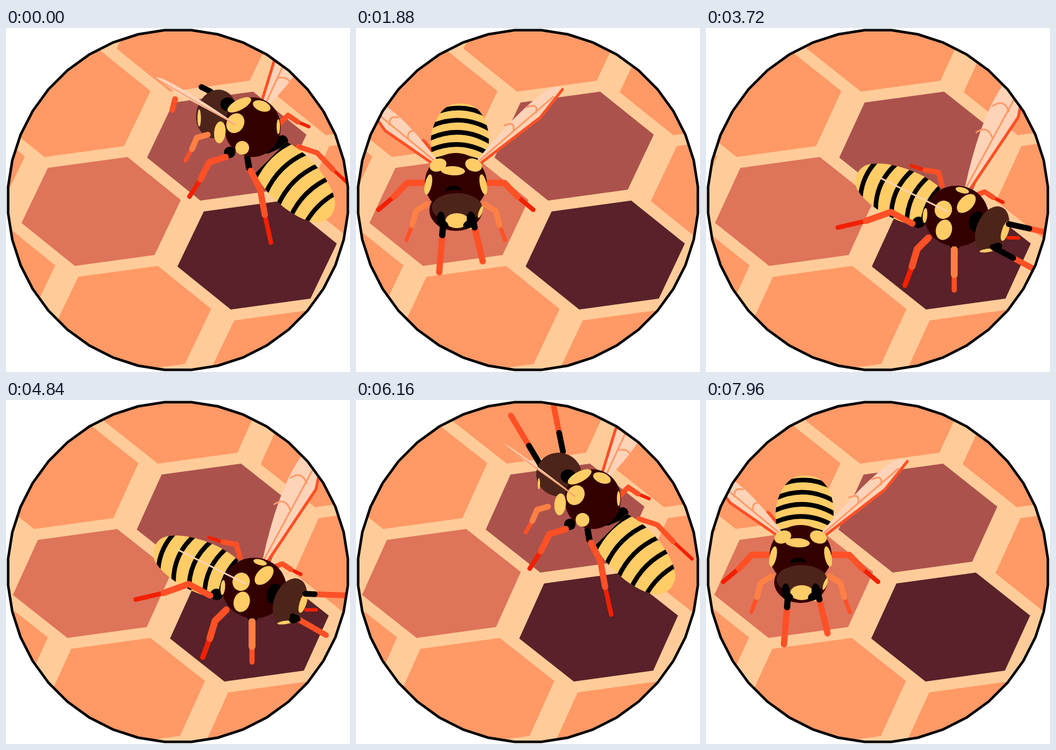
Write an HTML page with a canvas that moves like this. It is 600 px wide and 600 px high and loops after 8 s.

```html
<!DOCTYPE html>
<html lang="en">
<head>
<meta charset="utf-8">
<title>Wasp on honeycomb</title>
<style>
html, body { margin: 0; width: 100%; height: 100%; overflow: hidden; background: #fff; }
canvas { display: block; width: 600px; height: 600px; }
</style>
</head>
<body>
<canvas id="stage" width="600" height="600"></canvas>
<script>
const ctx = document.getElementById('stage').getContext('2d');
const LOOP = 8000, STEP = 2000, TURN = 740, FIRST_TURN = 860;
const BLACK = '#000', BODY = '#330000', HEAD = '#4d241a', YELLOW = '#ffcc66';
const LEG = '#ff5026', LIGHT = '#ff8045', FOOT = '#f22000';
const WING = '#ffd3b8', VEIN = '#ff9966', WAX = '#ffcc99';
const RAD = Math.PI / 180;

const clamp = v => Math.min(1, Math.max(0, v));
const smooth = v => { v = clamp(v); return v * v * (3 - 2 * v); };
const mix = (a, b, k) => a.map((v, i) => v + (b[i] - v) * k);
const drift = t => (1 - Math.cos(2 * Math.PI * t / 12000)) / 2;

function shape(color, d) {
  ctx.fillStyle = color;
  ctx.fill(new Path2D(d));
}
function line(color, width, d) {
  ctx.strokeStyle = color;
  ctx.lineWidth = width;
  ctx.stroke(new Path2D(d));
}
function oval(color, x, y, rx, ry, deg = 0) {
  ctx.fillStyle = color;
  ctx.beginPath();
  ctx.ellipse(x, y, rx, ry, deg * RAD, 0, 7);
  ctx.fill();
}
const spots = (...list) => list.forEach(s => oval(YELLOW, ...s));

// Draws in a frame whose x axis runs from one point to another.
function along(x1, y1, x2, y2, paint) {
  ctx.save();
  ctx.translate(x1, y1);
  ctx.rotate(Math.atan2(y2 - y1, x2 - x1));
  paint(Math.hypot(x2 - x1, y2 - y1));
  ctx.restore();
}

function leg(x1, y1, x2, y2, bend, width = 11, top = LEG, foot = FOOT) {
  along(x1, y1, x2, y2, len => {
    const joint = `${len * 0.62},${bend * 0.4}`;
    line(foot, width - 3, `M${joint}L${len},0`);
    line(top, width, `M0,0L${len * 0.28},${bend}L${joint}`);
  });
}

// Each state is base, tip and the black share of the length.
function antenna(from, to, k, width = 10) {
  const [x1, y1, x2, y2, dark] = mix(from, to, k);
  along(x1, y1, x2, y2, len => {
    line(LEG, width, `M${len * dark},0H${len}`);
    if (dark > 0.02) line(BLACK, width, `M0,0H${len * dark}`);
  });
}

// The sign of the width tells on which side of the red edge the wing lies.
function wing(x1, y1, x2, y2, w) {
  along(x1, y1, x2, y2, len => {
    shape(WING, `M0,0L${len * 0.7},${-w * 0.1}L${len},${w * 0.4}Q${len},${w} ${len * 0.8},${w}Q${len * 0.5},${w} 0,${w * 0.2}Z`);
    if (Math.abs(w) < 12) return line(VEIN, 2, `M0,0L${len},${w * 0.4}`);
    line(LEG, 5, `M0,0L${len * 0.7},${-w * 0.1}L${len},${w * 0.4}`);
    line(VEIN, 3, `M0,${w * 0.15}L${len * 0.9},${w * 0.4}`);
    for (const f of [0.45, 0.7])
      line(VEIN, 3, `M${len * f},${w * 0.3}q${len * 0.07},${w * 0.4} ${-len * 0.03},${w * 0.6}`);
  });
}

function abdomen(x1, y1, x2, y2, w, bulge) {
  along(x1, y1, x2, y2, len => {
    const outline = `M0,${-w * 0.42}C${len * 0.35},${-w * 0.62} ${len * 0.95},${-w * 0.45} ${len},${-w * 0.12}` +
      `Q${len * 1.03},0 ${len},${w * 0.12}C${len * 0.95},${w * 0.45} ${len * 0.35},${w * 0.62} 0,${w * 0.42}Z`;
    shape(YELLOW, outline);
    ctx.clip(new Path2D(outline));
    for (let i = 0; i < 5; i++) {
      const x = len * (0.02 + 0.21 * i) - bulge * 0.5;
      line(BLACK, 8, `M${x},${-w * 0.55}Q${x + bulge * 2},0 ${x},${w * 0.55}`);
    }
  });
}

function climbing(k) {
  wing(443, 138, 487, 15, 42);
  leg(476, 168, 528, 172, -17, 9);
  leg(510, 207, 603, 277, -11, 9);
  antenna([338, 112, 287, 27, 0.38], [295, 124, 290, 143, 0], k);
  antenna([378, 90, 362, 12, 0.42], [357, 111, 341, 103, 1], k);
  oval(HEAD, ...mix([371, 130, 40, 38], [367, 150, 35, 43], k), 15);
  oval(YELLOW, ...mix([336, 146, 2, 10], [337, 157, 3, 15], k));
  oval(BLACK, 387, 133, 13, 12);
  oval(BLACK, 390, 217, 10, 10);
  line(BLACK, 20, 'M455,209L482,197');
  abdomen(462, 226, 563, 328, 92, -10);
  leg(352, 186, 313, 231, 11, 10, LIGHT, LEG);
  leg(383, 225, 320, 294, 15);
  line(BLACK, 11, 'M421,226L424,244');
  leg(427, 249, 462, 374, -7);
  oval(BODY, 430, 173, 49, 52);
  spots([407, 134, 23, 9, -28], [400, 166, 15, 18, 30], [373, 182, 10, 19, 5],
    [412, 209, 12, 12], [446, 136, 16, 9, 20], [475, 172, 3, 13]);
  wing(399, 168, ...mix([272, 78, 5], [259, 91, 10], k));
}

function facing() {
  wing(289, 102, 195, 2, 30);
  line(BLACK, 9, 'M250,101L281,68');
  line(LEG, 10, 'M281,65Q295,48 291,8');
  abdomen(335, 143, 414, 174, 82, 14);
  leg(330, 200, 398, 290, -36);
  line(BLACK, 12, 'M324,190L328,201');
  leg(310, 200, 272, 287, -9, 12);
  leg(283, 197, 237, 258, 0, 11, LIGHT, LEG);
  leg(209, 152, 186, 200, -7, 9, LIGHT);
  leg(213, 143, 178, 195, -10, 9);
  oval(BODY, 301, 151, 44, 49);
  spots([294, 116, 20, 10, 35], [327, 141, 9, 19, -20], [315, 178, 11, 18, 20]);
  oval(BODY, 253, 142, 44, 40, 15);
  oval(HEAD, 272, 142, 25, 30, 15);
  spots([256, 121, 16, 14, 25], [218, 145, 5, 16, 32], [241, 162, 13, 9, 25], [264, 171, 9, 5]);
  oval(BLACK, 230, 121, 10, 16, 25);
  oval(HEAD, 229, 120, 6, 11, 25);
  oval(BLACK, 256, 149, 20, 14, 5);
  oval('#65452f', 252, 149, 9, 9);
  spots([264, 151, 6, 5], [229, 125, 4, 5]);
  line(BLACK, 11, 'M286,134L316,104');
  line(LEG, 10, 'M318,102L340,65');
  wing(322, 144, 523, 142, 4);
}

function descending(k) {
  const center = 165, sides = [-1, 1];
  line(LEG, 9, 'M108,198L120,212');
  abdomen(170, 234, 176, 133, 100, 15);
  for (const s of sides) {
    leg(center + s * 55, 270, center + s * 135, 317, -15 * s);
    leg(center + s * 50, 307, center + s * 86, 370, -11 * s, 10, LIGHT, LEG);
  }
  oval(BODY, center, 270, 54, 52);
  wing(134, 243, 5, 148, 32);
  wing(199, 243, ...mix([358, 116], [363, 120], k), -28);
  spots([160, 249, 21, 8, 3]);
  for (const s of sides) spots([center + s * 31, 239, 15, 11, 20 * s], [center + s * 48, 273, 6, 18, -12 * s]);
  oval(BLACK, 161, 286, 15, 11);
  oval(BODY, center, 318, 46, 36);
  oval(HEAD, ...mix([167, 313, 44, 25], [157, 302, 30, 20], k));
  spots([208, 321, 3, 11, 20], mix([167, 336, 20, 13], [160, 328, 20, 9], k),
    mix([192, 347, 9, 4], [162, 349, 15, 4], k));
  for (const s of sides) {
    oval(BLACK, center + s * 23, 342, 11, 7, -28 * s);
    oval(BLACK, center + s * 26, 308 + 25 * (1 - k), 7, 13);
    oval('#8b6650', center + s * 26, 340, 4 * k, 4 * k);
  }
  antenna([143, 342, 136, 426, 0.23], [128, 293, 117, 307, 0], k, 11);
  antenna([193, 328, 212, 407, 0.25], [190, 293, 198, 307, 0], k, 11);
}

function crossing(nod, sway) {
  wing(460, 282, 575, 98, -48);
  leg(412, 275, 358, 240, 16, 9);
  leg(470, 292, 518, 304, -10, 9);
  abdomen(394, 313, 265, 256, 88, 12);
  oval(BLACK, 371, 339, 11, 10);
  leg(360, 341, 230, 348, 22);
  leg(388, 366, 347, 449, 9, 12);
  oval(BLACK, 434, 380, 9, 6);
  leg(433, 386, 433, 457, 0, 12, LIGHT, LEG);
  oval(BODY, 437, 328, 56, 53);
  spots([454, 306, 20, 12, -45], [414, 317, 15, 16, 20], [415, 352, 14, 18, 15],
    [382, 327, 4, 13, 5], [447, 283, 12, 5, 15]);
  line(WING, 3, 'M305,262L421,320');
  oval(BLACK, 472, 338, 13, 18, 15);
  line(FOOT, 6, 'M527,366L545,366');
  oval(HEAD, 499, 351, 27, 42, 24);
  spots([522, 354, 6, 18, 18], [491, 388, 14, 3, -8]);
  oval(BLACK, 507, 382, 10, 7, -20);
  antenna([528, 342, 600, 358, 0.5], [526, 338, 600, 341, 0.22], sway);
  antenna([500, 382, 575, 422, 0.48], [504, 377, 562, 410, 0.15], sway);
}

// Each view fits one angle on the wasp's round path; drawnAt is its place in the drift.
const views = [
  { paint: climbing, angle: -47, x: 430, y: 173, drawnAt: 0 },
  { paint: facing, angle: -99.5, x: 300, y: 150, drawnAt: 1160 },
  { paint: descending, angle: -195, x: 165, y: 272, drawnAt: 7960 },
  { paint: crossing, angle: -311, x: 437, y: 327, drawnAt: 3720 },
  { paint: climbing, angle: -407, x: 430, y: 173, drawnAt: 0 }
];
const rests = [-47, -195, -311, -407];
const orbit = deg => [165 * Math.cos(deg * RAD), 105 * Math.sin(deg * RAD)];

function wasp(t) {
  const phase = (t - FIRST_TURN + 3 * STEP) % (3 * STEP);
  const step = Math.floor(phase / STEP);
  const turned = smooth(phase % STEP / TURN);
  const angle = rests[step] + (rests[step + 1] - rests[step]) * turned;
  const away = view => Math.abs(view.angle - angle);
  const view = views.reduce((best, v) => away(v) < away(best) ? v : best);
  const [x, y] = orbit(angle), [homeX, homeY] = orbit(view.angle);
  const nod = smooth(1.2 - Math.abs((t + 1400) % 2800 - 1400) / 350);
  const sway = clamp((t - 3720) / 1120);

  ctx.save();
  ctx.translate(17 * (drift(view.drawnAt) - drift(t)) + x - homeX + view.x, y - homeY + view.y);
  ctx.rotate((angle - view.angle) * RAD);
  ctx.translate(-view.x, -view.y);
  view.paint(nod, sway);
  ctx.restore();
}

function honeycomb(t) {
  const special = { '0,0': '#592129', '-1,0': '#de745a', '0,-1': '#ab524c' };
  const lean = drift(t);
  ctx.fillStyle = WAX;
  ctx.fillRect(0, 0, 600, 600);
  ctx.save();
  ctx.transform(1, 0, 0.029 * lean, 1, -26.3 * lean, 0);
  for (let i = -3; i <= 3; i++) for (let j = -3; j <= 3; j++) {
    ctx.save();
    ctx.translate(438 + 272 * i + 53 * j, 396 + 76 * i + 190 * j);
    shape(special[`${i},${j}`] || '#ff9966', 'M-139,20L-93,-76L46,-95L139,-20L93,76L-46,95Z');
    ctx.restore();
  }
  ctx.restore();
}

const disc = new Path2D();
for (let i = 0; i < 40; i++) {
  const a = (i + 0.5) * Math.PI / 20;
  disc.lineTo(300 + 297.2 * Math.cos(a), 300 + 297.2 * Math.sin(a));
}
disc.closePath();

function draw(t) {
  ctx.fillStyle = '#fff';
  ctx.fillRect(0, 0, 600, 600);
  ctx.lineCap = ctx.lineJoin = 'round';
  ctx.save();
  ctx.clip(disc);
  honeycomb(t);
  wasp(t);
  ctx.restore();
  ctx.strokeStyle = BLACK;
  ctx.lineWidth = 4.5;
  ctx.stroke(disc);
}

const start = performance.now();
function tick() {
  draw((performance.now() - start) % LOOP);
  requestAnimationFrame(tick);
}
tick();
</script>
</body>
</html>
```
